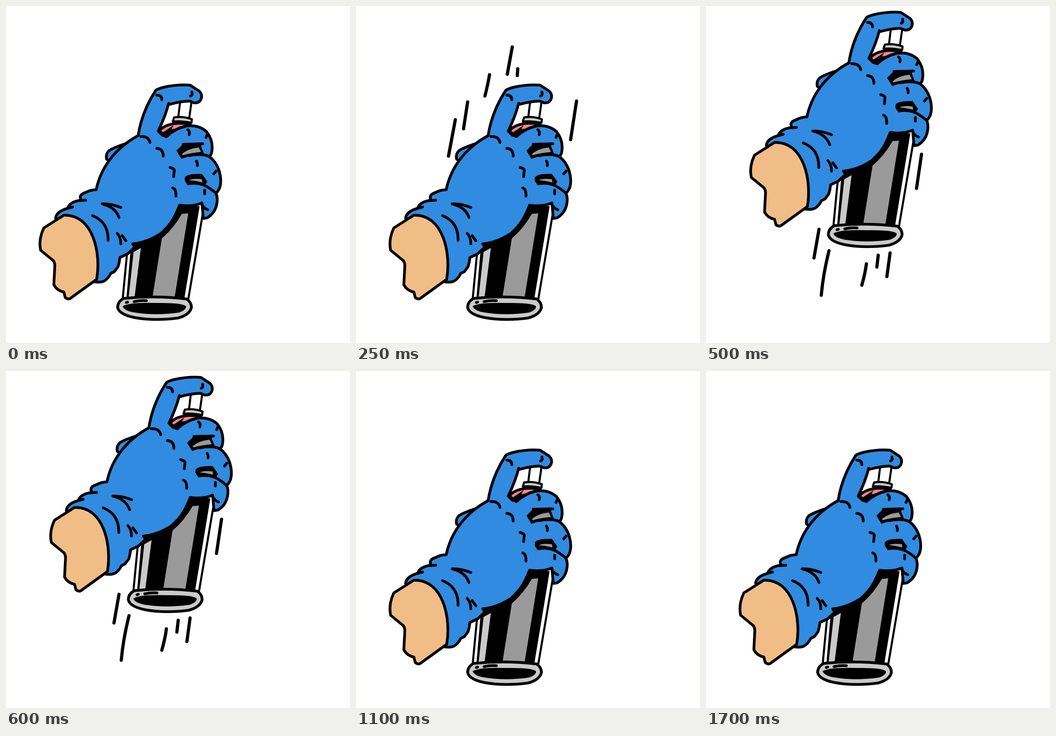
Animation of 755x741 px, one loop 2000 ms. Source, as an HTML page:

```html
<!DOCTYPE html>
<html lang="en">
<head>
<meta charset="utf-8">
<title>Spray can</title>
<style>
  html, body { margin: 0; height: 100%; overflow: hidden; background: #fff; }
  svg { display: block; width: 100%; height: 100%; }
  .ink { stroke: #000; stroke-width: 6; stroke-linecap: round; stroke-linejoin: round; fill: none; }
  .fine { stroke-width: 4.5; }
  .speed { stroke-width: 7; }
  .glove { fill: #318be0; }
  .skin { fill: #f0bd86; }
  .metal { fill: #c9cac9; }
  .grey { fill: #9a9a9a; }
  .white { fill: #fff; }
  .pink { fill: #fb8394; }
  .mist { fill: #ea8493; }
  .drop { fill: #e0455f; }
</style>
</head>
<body>
<svg viewBox="0 0 755 741">
  <g id="arm">
    <!-- can -->
    <path class="ink fine white" d="M267 530L256 645H400L433 450L430 425Z"/>
    <path d="M274 530L264 646H391L425 440H380Z"/>
    <path class="metal" d="M280 541L296 532L282 641L269 642Z"/>
    <path class="grey" d="M386 457L400 456L370 641L322 637L342 511Q368 489 386 457Z"/>
    <path class="ink metal" d="M258 643Q325 636 396 644Q407 651 407 663Q403 679 378 686Q325 693 282 685Q248 678 245 663Q245 650 258 643Z"/>
    <path d="M256 660Q270 651 330 653Q386 652 395 660Q396 668 380 674Q330 681 290 675Q260 672 256 660Z"/>
    <path class="ink" d="M264 652L267 651M281 650Q295 647 308 648"/>
    <!-- nozzle -->
    <path class="ink fine white" d="M382 212L378 245L402 247L407 212"/>
    <path class="ink fine metal" d="M369 245Q388 242 408 249L407 257Q385 252 366 254Z"/>
    <path class="ink pink" d="M337 275Q346 261 375 258Q395 257 405 262L352 288Z"/>
    <path d="M341 280L356 270L368 262L363 271L380 268L353 290Z"/>
    <!-- glove -->
    <path class="ink glove" d="M268 301Q238 310 226 318Q218 326 221 337L228 341Z"/>
    <path class="ink glove" id="hand"/>
    <path d="M374 318L389 303L432 300L428 308L435 326L407 329L385 336Z"/>
    <path class="grey" d="M386 326Q398 314 423 311L428 321Q405 323 388 328Z"/>
    <path d="M393 376Q400 368 430 369L442 386L437 394Q415 389 397 391Q390 384 393 376Z"/>
    <path class="grey" d="M401 383Q412 378 430 381L431 388Q415 384 401 383Z"/>
    <path class="ink" d="M352 287Q370 270 395 264M389 304L432 303M402 329Q415 326 432 327Q440 328 446 331M400 391Q427 386 447 401Q456 407 461 412M430 436Q434 445 443 448
      M331 196Q342 196 342 206M296 287Q313 286 316 300M331 313Q345 314 345 330M360 355Q372 358 369 364L368 375M366 400Q374 403 373 418
      M399 272Q404 275 402 283M442 282L439 289M418 341Q421 346 420 351M461 363L456 369M436 405V413
      M252 443Q230 434 211 435Q240 442 248 465M190 461Q225 475 224 515M244 500Q252 508 252 523M255 505L263 516M135 445L146 442M160 428L175 427"/>
    <path class="ink" id="tipMark" d="M408 189Q410 196 405 198"/>
    <path class="ink skin" d="M127 460L83 488Q71 513 76 537L104 560Q108 566 107 574L105 613Q112 626 127 629L130 641Q137 646 141 643L199 601C209 545 192 458 127 460Z"/>
  </g>
  <path class="ink speed" id="falling" d="M343 90L332 150M355 138L354 153M293 151Q290 170 283 198M245 211L236 270M218 250L203 330M484 209L471 294"/>
  <path class="ink speed" id="rising" d="M473 326L462 401M248 491L237 554M270 538Q257 590 253 636M352 567Q350 585 342 614M378 548L375 574M404 543L397 595"/>
  <g id="spray">
    <path class="mist" d="M429 233L533 206A24 22 0 0 1 556 185A18 18 0 0 1 570 167A32 29 0 0 1 633 170A18 14 0 0 1 652 178A20 20 0 0 1 675 202A14 14 0 0 1 686 217A26 26 0 0 1 671 264A19 19 0 0 1 655 282A30 30 0 0 1 611 307A27 23 0 0 1 574 286A26 23 0 0 1 540 261L429 241A4 4 0 0 1 429 233Z"/>
  </g>
</svg>
<script>
const $ = id => document.getElementById(id);
const LOOP = 2000;

const fingertip = {
  raised: 'Q334 182 345 179Q375 172 404 174L424 187Q432 195 428 205Q424 214 413 213L403 209Q380 210 360 216',
  pressed: 'Q340 181 360 183L404 192L420 204Q425 212 420 220Q412 228 403 226L402 221Q380 219 360 217',
};
const hand = tip => `M198 404C207 360 235 315 290 285C296 245 312 211 329 185${tip}L357 214Q350 242 334 275
  L343 284L352 287Q370 270 395 264Q422 260 440 276Q455 295 452 318Q451 328 446 331
  Q460 341 467 360Q475 385 468 402Q465 408 461 412Q465 421 463 433Q460 455 441 466L433 467L430 433Q410 442 381 438
  C372 460 365 478 340 500Q310 520 278 523L283 530L267 545L250 553Q249 564 246 573L238 584L230 588Q224 600 215 605Q206 609 192 606
  L109 467Q110 452 135 445Q140 430 165 427Q158 415 175 410Q186 404 198 404Z`;

const circles = (cls, list) => list.forEach(([x, y, r]) =>
  $('spray').insertAdjacentHTML('beforeend', `<circle class="${cls}" cx="${x}" cy="${y}" r="${r}"/>`));
circles('mist', [[519, 190, 6.5], [648, 157, 5.5], [691, 267, 9], [656, 311, 5.5], [599, 322, 4], [530, 270, 5]]);
circles('drop', [[594, 184, 4.8], [648, 196, 4], [623, 205, 4.4], [553, 224, 4.2], [598, 233, 4], [671, 225, 4],
  [635, 255, 4.2], [585, 264, 4], [616, 286, 4.8]]);

// Shake every 50 ms, then puff every 100 ms.
function pose(t) {
  if (t >= 100 && t < 700) return Math.floor(t / 50) % 2 ? 'down' : 'up';
  if (t >= 800 && t < 1700 && Math.floor(t / 100) % 2 === 0) return 'spray';
  return 'rest';
}

const show = (id, on) => $(id).setAttribute('visibility', on ? 'visible' : 'hidden');

function draw(now) {
  const p = pose(now % LOOP);
  $('arm').setAttribute('transform', p === 'up' ? 'translate(23.5 -160)' : '');
  $('hand').setAttribute('d', hand(p === 'spray' ? fingertip.pressed : fingertip.raised));
  show('tipMark', p !== 'spray');
  show('spray', p === 'spray');
  show('falling', p === 'down');
  show('rising', p === 'up');
}

const start = performance.now();
function tick() {
  draw(performance.now() - start);
  requestAnimationFrame(tick);
}
tick();
</script>
</body>
</html>
```
